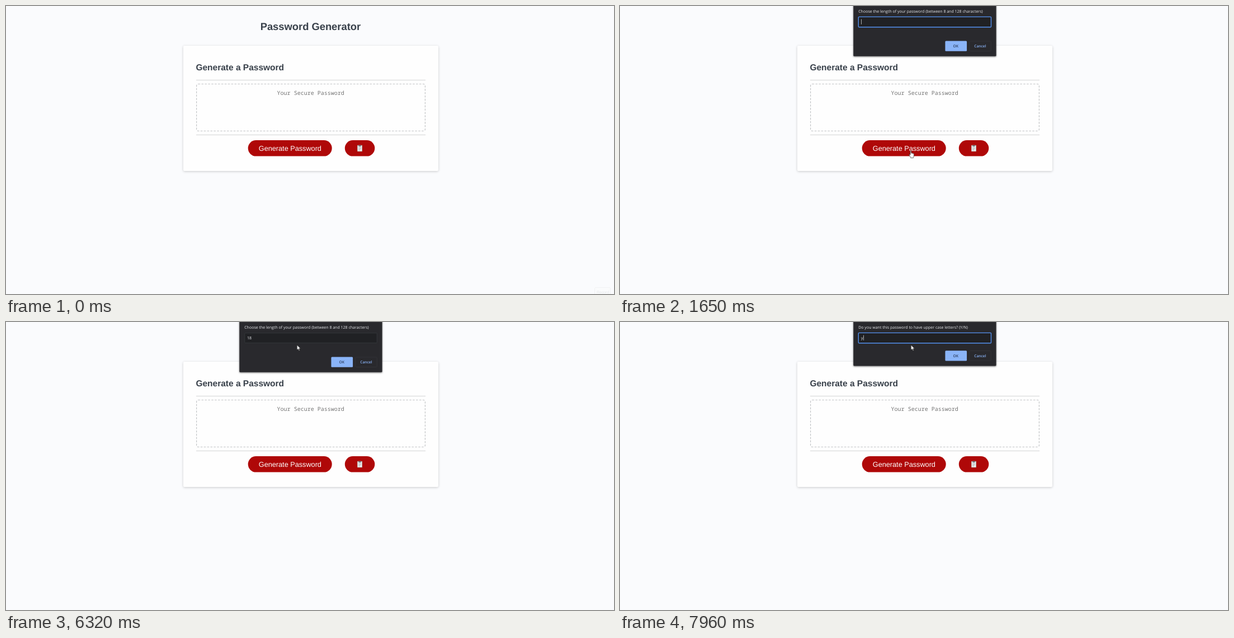
An HTML page for the animation above (8000 ms loop, 1087 by 515 pixels).

```html
<!DOCTYPE html>
<html lang="en">
<head>
<meta charset="utf-8">
<title>Password Generator</title>
<style>
html, body { margin: 0; width: 100%; height: 100%; overflow: hidden; background: #fafbfd; }
.layer { position: absolute; left: 0; top: 0; width: 1087px; height: 515px; }
svg { position: absolute; left: 0; top: 0; overflow: visible; }
text { text-rendering: geometricPrecision; }

.page { font-family: "Liberation Sans", Arial, sans-serif; }
.head { font-weight: 700; fill: #38404a; }
.card { position: absolute; left: 317px; top: 71px; width: 456px; height: 224px; border-radius: 2px;
  background: #fefefe; box-shadow: 0 1px 4px rgba(0, 0, 0, .2); }
.mono { font: 10.03px "Noto Sans Mono", "DejaVu Sans Mono", monospace; fill: #757575; }
.btn { fill: #af0808; }

.dialog { transform-origin: 545px 0; font-family: "Open Sans", "Noto Sans", sans-serif; }
.dialog text { font-size: 7.02px; fill: #e8eaed; }
.panel { fill: #29292d; filter: drop-shadow(0 1px 1.5px rgba(0, 0, 0, .55)); }
.field { fill: #202124; stroke: #3c3f43; stroke-width: .7px; }
.ring { fill: none; stroke: #5390ee; stroke-width: 1.4px; }
.ok { fill: #8ab4f8; }
.cancel { fill: none; stroke: #38393d; stroke-width: .7px; }
.dialog .label { font-size: 6.6px; font-weight: 600; text-anchor: middle; }
.dialog .dark { fill: #2b3c5c; }
.dialog .blue { fill: #8ab4f8; }
.caret { fill: #e8eaed; }

/* every timeline is one 8 s loop of held steps */
.anim { animation: 8s step-end infinite; }
#record { animation-name: record; }
#first { animation-name: first; }
#second { animation-name: second; }
#ring { animation-name: ring; }
#caretA { animation-name: caretA; }
#one { animation-name: one; }
#eight { animation-name: eight; }
#caretB { animation-name: caretB; }
#caretC { animation-name: caretC; }
#yes { animation-name: yes; }
#pointer { animation-name: move; }
#arrow { animation-name: arrow; }
#hand { animation-name: hand; }

@keyframes record { 0% { opacity: 1 } 4.125%, 100% { opacity: 0 } }

@keyframes first {
  0% { opacity: 0; transform: none }
  18.25% { opacity: .1; transform: translateY(-9px) perspective(600px) rotateX(6deg) }
  19.125% { opacity: .44; transform: translateY(-6.6px) perspective(600px) rotateX(4deg) }
  19.875% { opacity: .86; transform: translateY(-3.8px) perspective(600px) rotateX(2.4deg) }
  20.625% { opacity: 1; transform: none }
  79.875% { opacity: .8; transform: translateY(-3px) perspective(600px) rotateX(2deg) }
  80.625% { opacity: .33; transform: translateY(-6.6px) perspective(600px) rotateX(4deg) }
  81.5% { opacity: .06; transform: translateY(-9px) perspective(600px) rotateX(6deg) }
  82.25%, 100% { opacity: 0; transform: none }
}
@keyframes second {
  0% { opacity: 0; transform: none }
  79.875% { opacity: .44; transform: translateY(-6.6px) perspective(600px) rotateX(4deg) }
  80.625% { opacity: .85; transform: translateY(-3.8px) perspective(600px) rotateX(2.4deg) }
  81.5%, 100% { opacity: 1; transform: none }
}

@keyframes ring { 0% { opacity: 1 } 79%, 100% { opacity: 0 } }
@keyframes caretA {
  0%, 31.375%, 44.5%, 58.5% { opacity: 1 }
  24.75%, 38%, 51.125%, 65%, 100% { opacity: 0 }
}
@keyframes one { 0% { opacity: 0 } 66.625%, 100% { opacity: 1 } }
@keyframes eight { 0% { opacity: 0 } 67.5%, 100% { opacity: 1 } }
@keyframes caretB {
  0% { opacity: 0; transform: none }
  66.625% { opacity: 1; transform: translateX(-4px) }
  67.5% { opacity: 1; transform: none }
  74.875%, 100% { opacity: 0; transform: none }
}
@keyframes caretC {
  0%, 93% { opacity: 1; transform: none }
  85.625% { opacity: 0; transform: none }
  99.5%, 100% { opacity: 1; transform: translateX(3.5px) }
}
@keyframes yes { 0% { opacity: 0 } 99.5%, 100% { opacity: 1 } }

@keyframes move {
  0% { transform: translate(1087px, 530px) }
  4.125% { transform: translate(1038px, 506px); animation-timing-function: steps(3) }
  6.594% { transform: translate(940px, 462px); animation-timing-function: steps(3) }
  9.063% { transform: translate(735px, 364px); animation-timing-function: steps(3) }
  11.531% { transform: translate(584px, 293px); animation-timing-function: steps(3) }
  14% { transform: translate(523px, 263.5px) }
  14.875% { transform: translate(521.5px, 261px) }
  15.75% { transform: translate(520.5px, 259.5px) }
  16.5% { transform: translate(519.8px, 258.5px) }
  24% { transform: translate(518px, 250px) }
  24.8125% { transform: translate(515px, 229px); animation-timing-function: steps(5) }
  28.875% { transform: translate(504.3px, 90px) }
  30.5% { transform: translate(512px, 62px) }
  31.313% { transform: translate(518px, 46px) }
  32.125%, 100% { transform: translate(520.3px, 41px) }
}
@keyframes arrow { 0%, 24.8125%, 100% { opacity: 1 } 14% { opacity: 0 } }
@keyframes hand { 0%, 24.8125%, 100% { opacity: 0 } 14% { opacity: 1 } }
</style>
</head>
<body>
<div class="layer" style="overflow:hidden">
  <div class="card"></div>
  <svg class="page" width="1087" height="515">
    <text class="head" x="454.7" y="43.2" font-size="18.35">Password Generator</text>
    <text class="head" x="339.4" y="115" font-size="15.5">Generate a Password</text>
    <path d="M340 132.5H750M340 230.5H750" stroke="#d3d4d5"/>
    <rect x="340.6" y="139.5" width="408.8" height="84" rx="3" fill="none" stroke="#c2c4c6" stroke-width="1.2" stroke-dasharray="3.6 2.3"/>
    <text class="mono" x="484.6" y="159">Your Secure Password</text>

    <rect class="btn" x="432.7" y="240" width="150" height="28.6" rx="14.3"/>
    <text x="451.8" y="258.5" font-size="12.7" fill="#fff">Generate Password</text>
    <rect class="btn" x="605.8" y="240" width="53.5" height="28.6" rx="14.3"/>
    <rect x="628" y="248.8" width="9" height="11.4" rx=".8" fill="#b9aaa4"/>
    <rect x="628.9" y="250" width="7.2" height="9.4" fill="#f3f3f3"/>
    <path d="M630 253.2H635M630 255.2H635M630 257.2H633.5" stroke="#8b9196" stroke-width=".7"/>
    <path d="M630.3 251.2V249.2H631.6A1 1 0 0 1 633.4 249.2H634.7V251.2Z" fill="#66727a"/>

    <g id="record" class="anim">
      <rect x="1052.5" y="503.5" width="28" height="14" rx="1.5" fill="#fafbfc" stroke="#f1f2f4"/>
      <text x="1056" y="514" font-size="6.8" fill="#e6e8ea">Record</text>
    </g>
  </svg>

  <div id="first" class="layer dialog anim">
    <svg width="1087" height="515">
      <rect class="panel" x="417.3" y="-30" width="255.2" height="119.8" rx="1.5"/>
      <text x="426.2" y="12">Choose the length of your password (between 8 and 128 characters)</text>
      <rect class="field" x="426.8" y="19.8" width="236.4" height="17.6" rx="1"/>
      <rect id="ring" class="ring anim" x="426.3" y="19.4" width="237.2" height="18.4" rx="1.2"/>
      <text id="one" class="anim" x="430.9" y="30.7">1</text>
      <text id="eight" class="anim" x="434.9" y="30.7">8</text>
      <rect id="caretA" class="caret anim" x="431.1" y="23.6" width=".7" height="9.2"/>
      <rect id="caretB" class="caret anim" x="438.7" y="23.6" width=".7" height="9.2"/>
      <rect class="ok" x="581.4" y="62.6" width="38.7" height="18.2" rx="1.5"/>
      <text class="label dark" x="600.3" y="74.1">OK</text>
      <rect class="cancel" x="624.8" y="62.9" width="38.4" height="17.6" rx="1.5"/>
      <text class="label blue" x="643.8" y="74.1">Cancel</text>
    </svg>
  </div>

  <div id="second" class="layer dialog anim">
    <svg width="1087" height="515">
      <rect class="panel" x="417.3" y="-30" width="255.2" height="108.4" rx="1.5"/>
      <text x="426.2" y="12">Do you want this password to have upper case letters? (Y/N)</text>
      <rect class="field" x="426.8" y="19.8" width="236.4" height="17.6" rx="1"/>
      <rect class="ring" x="426.3" y="19.4" width="237.2" height="18.4" rx="1.2"/>
      <text id="yes" class="anim" x="430.9" y="30.7">y</text>
      <rect id="caretC" class="caret anim" x="431.1" y="23.6" width=".7" height="9.2"/>
      <rect class="ok" x="581.4" y="51.2" width="38.7" height="18.2" rx="1.5"/>
      <text class="label dark" x="600.3" y="62.7">OK</text>
      <rect class="cancel" x="624.8" y="51.5" width="38.4" height="17.6" rx="1.5"/>
      <text class="label blue" x="643.8" y="62.7">Cancel</text>
    </svg>
  </div>

  <div id="pointer" class="layer anim">
    <svg width="1" height="1" fill="#fff" stroke="#1c1c1c" stroke-width=".7" stroke-linejoin="round">
      <path id="arrow" class="anim" d="M0 0V9.2L2.1 7.3L3.6 10.6L5 10L3.6 6.8H6.3Z"/>
      <path id="hand" class="anim" d="M-.9 .9Q0 -.5 .9 .9V4.6Q1.8 3.9 2.5 4.9Q3.4 4.3 4.1 5.3Q5.6 4.9 5.8 6.4V9Q5.6 10.6 4.8 11.4V13H-.2V11.8Q-1.6 10.4 -2.9 7.9Q-3.3 6.5 -2 6.7L-.9 7.8Z"/>
    </svg>
  </div>
</div>
</body>
</html>
```
